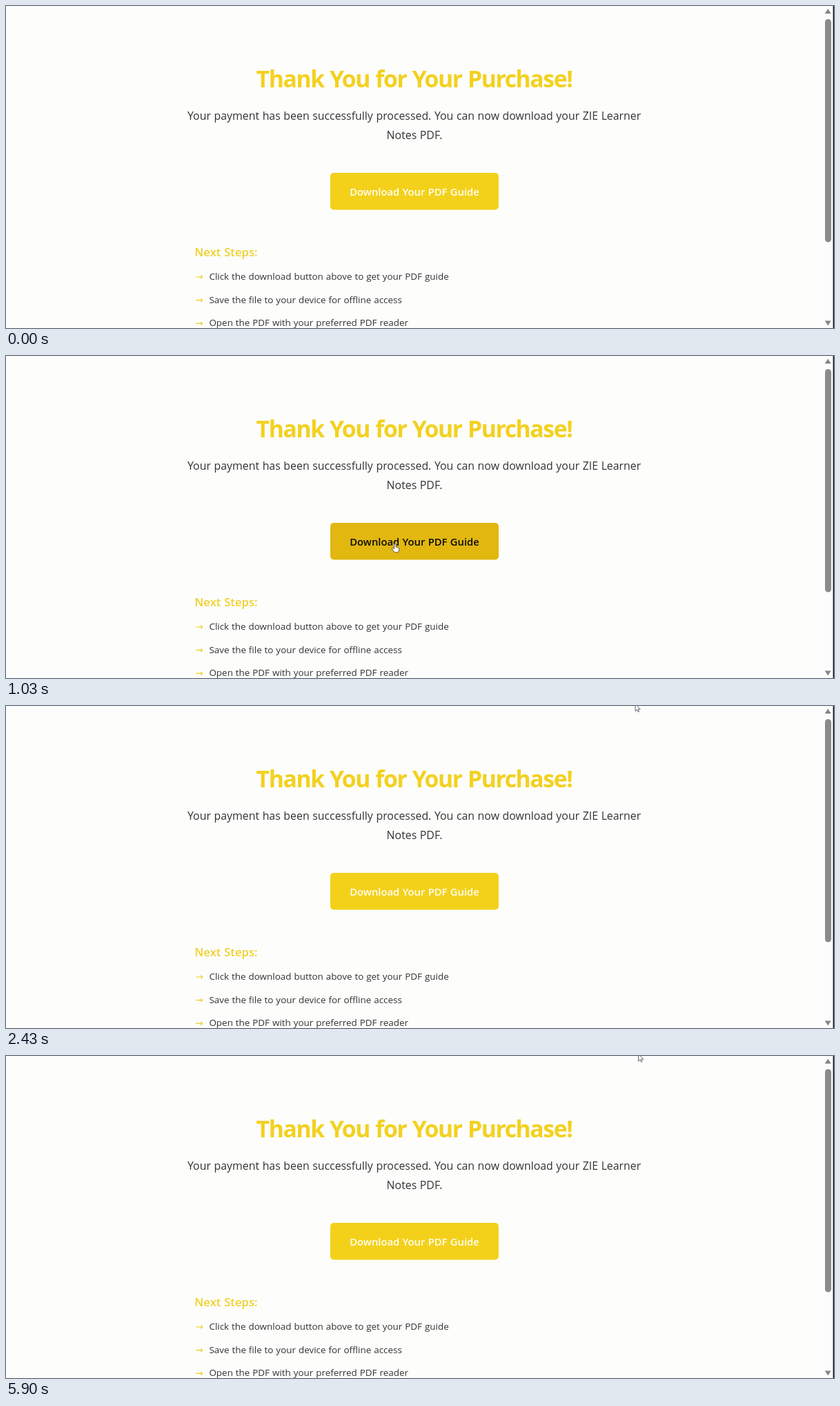
Animation of 1200x467 px, one loop 5.93 s. Source, as an HTML page:

```html
<!DOCTYPE html>
<html lang="en">
<head>
<meta charset="utf-8">
<title>Thank you</title>
<style>
  html, body { margin: 0; width: 100%; height: 100%; overflow: hidden; background: #fdfdfc; }
  svg { display: block; width: 100vw; height: 100vh; }
  text { font-family: "Open Sans", "Noto Sans", sans-serif; fill: #333; word-spacing: .028em; }
  .mid { text-anchor: middle; }
  .title { font-size: 33.7px; font-weight: 700; letter-spacing: -1.4px; fill: #f3d11f; }
  .lead { font-size: 15.88px; }
  .label { font-size: 14.8px; font-weight: 600; }
  .sub { font-size: 16.7px; font-weight: 600; fill: #f0d02c; }
  .item { font-size: 13.46px; }
  .arrow { fill: none; stroke: #f0d02c; stroke-width: 1.2; }
  .cursor { fill: #fff; stroke: #3c3f4c; stroke-width: .8; stroke-linejoin: round; }
</style>
</head>
<body>
<svg viewBox="0 0 1200 467">
  <rect width="1200" height="467" fill="#fdfdfc"/>
  <text class="title mid" x="591.5" y="118">Thank You for Your Purchase!</text>
  <text class="lead" x="263" y="165">Your payment has been successfully processed. You can now download your ZIE Learner</text>
  <text class="lead mid" x="592" y="192.5">Notes PDF.</text>

  <rect id="button" x="470" y="242" width="244" height="53.5" rx="5"/>
  <text id="label" class="label mid" x="592" y="275">Download Your PDF Guide</text>

  <text class="sub" x="273.3" y="363">Next Steps:</text>
  <g id="list"></g>

  <rect x="1185" width="13.5" height="467" fill="#fcfcfc"/>
  <rect x="1187" y="19" width="9" height="323.5" rx="4.5" fill="#8a8a8a"/>
  <path d="M1186.7 11 l4.5 -7 l4.5 7z M1186.7 456.5 l4.5 7 l4.5 -7z" fill="#858585"/>
  <rect x="1198.6" width="1.4" height="467" fill="#111"/>

  <g id="cursor" class="cursor">
    <path id="pointer" d="M0 0 V10.5 L2.4 8.3 L4 11.7 L5.6 11 L4.1 7.7 H7.2z"/>
    <path id="hand" d="M-1.2 1 a1.2 1.2 0 0 1 2.4 0 V5 l3.4 .8 q1.4 .4 1.2 2 l-.5 3 q-.3 1.9 -2.2 1.9 h-2.6 q-1.2 0 -2 -1 l-2.9 -3.9 q-.5 -1.2 .6 -1.4 q.9 0 2.6 1.4z"/>
  </g>
</svg>
<script>
const LOOP = 5930, FADE = 300;
const HOVER = { start: 650, end: 2055 };
const REST = [243, 209, 27], DARK = [225, 183, 16];

// Key points of the cursor
const EDGE = { x: 1193, y: 430 };
const ENTRY = { x: 597, y: 274 };
const CLICK = { x: 564, y: 272 };
const EXIT = { x: 912, y: -3 };
const BACK = { x: 1062, y: 0 };
const PARK = { x: 916.5, y: -3 };

const middle = (a, b) => ({ x: (a.x + b.x) / 2, y: (a.y + b.y) / 2 });

// A glide runs along a curve pulled towards its bend, then rests until "hide" or the next glide
const glide = (start, end, from, to, bend = middle(from, to), hide = LOOP) =>
  ({ start, end, from, to, bend, hide });
const GLIDES = [
  glide(170, 730, EDGE, ENTRY),
  glide(730, 1030, ENTRY, CLICK),
  glide(1900, 2430, CLICK, EXIT, { x: 976, y: 200 }, 4300),
  glide(4470, 4900, BACK, PARK, { x: 985, y: 30 })
];

const $ = id => document.getElementById(id);
const mix = (a, b, p) => a + (b - a) * p;
const clamp = v => Math.min(1, Math.max(0, v));
const slow = p => 1 - (1 - p) ** 1.2;

const items = [
  "Click the download button above to get your PDF guide",
  "Save the file to your device for offline access",
  "Open the PDF with your preferred PDF reader"
];
$("list").innerHTML = items.map((text, i) => {
  const y = 397 + i * 33.7;
  return `<path class="arrow" d="M274.8 ${y - 4} h10 m-2.6 -2.3 l2.6 2.3 l-2.6 2.3"/>
    <text class="item" x="294.4" y="${y}">${text}</text>`;
}).join("");

// Cubic curve of the CSS "ease" keyword
function ease(x) {
  const curve = (u, a, b) => 3 * a * u * (1 - u) ** 2 + 3 * b * u * u * (1 - u) + u ** 3;
  let lo = 0, hi = 1;
  for (let i = 0; i < 20; i++) {
    const u = (lo + hi) / 2;
    if (curve(u, .25, .25) < x) lo = u; else hi = u;
  }
  return curve(lo, .1, 1);
}

function locate({ start, end, from, bend, to }, t) {
  const u = slow(clamp((t - start) / (end - start)));
  const along = k => mix(mix(from[k], bend[k], u), mix(bend[k], to[k], u), u);
  return `translate(${along("x")},${along("y")})`;
}

function draw(t) {
  const over = t >= HOVER.start && t < HOVER.end;
  const fade = start => ease(clamp((t - start) / FADE));
  const shade = fade(HOVER.start) - fade(HOVER.end);
  const rgb = REST.map((c, i) => Math.round(mix(c, DARK[i], shade)));
  $("button").style.fill = `rgb(${rgb})`;
  $("label").style.fill = over ? "#0b0b0b" : "#fffef5";

  const move = GLIDES.filter(g => t >= g.start).pop();
  const shown = move && t < move.hide;
  $("cursor").style.display = shown ? "" : "none";
  $("pointer").style.display = over ? "none" : "";
  $("hand").style.display = over ? "" : "none";
  if (shown) $("cursor").setAttribute("transform", locate(move, t));
}

const begin = performance.now();
function tick() {
  draw((performance.now() - begin) % LOOP);
  requestAnimationFrame(tick);
}
tick();
</script>
</body>
</html>
```
